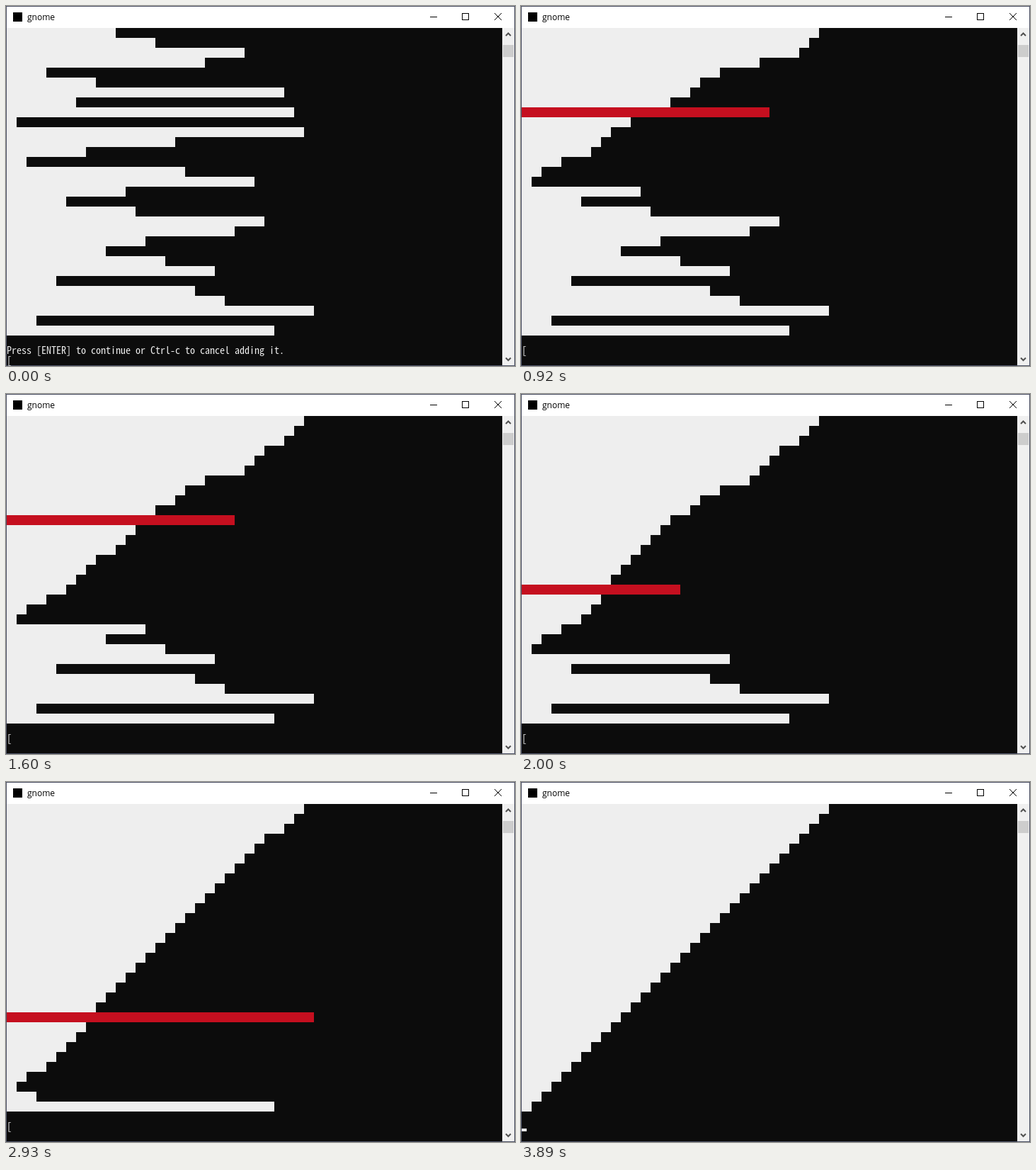
An HTML page for the animation above (4.05 s loop, 719x508 px).

```html
<!DOCTYPE html>
<html lang="en">
<head>
<meta charset="utf-8">
<title>gnome</title>
<style>
  html, body { margin: 0; width: 100%; height: 100%; overflow: hidden; background: #fff; }
  svg { display: block; width: 719px; height: 508px; }
  .title { font: 12px "Open Sans", sans-serif; }
  .console { font: 14px "Noto Sans Mono CJK JP", "Noto Sans Mono", monospace; fill: #eee; white-space: pre; }
  .icon { fill: none; stroke: #000; }
  .chevron { fill: none; stroke: #505050; stroke-width: 2; }
</style>
</head>
<body>
<svg viewBox="0 0 719 508">
  <rect width="719" height="508" fill="#4d5266"/>
  <rect x="1" y="1" width="717" height="30" fill="#fff"/>
  <rect x="10" y="9" width="13" height="13"/>
  <text class="title" x="30" y="20">gnome</text>
  <g class="icon">
    <path d="M599 15.5h10M644.5 10.5h9v9h-9z" shape-rendering="crispEdges"/>
    <path d="M690 10l10 10M700 10l-10 10"/>
  </g>
  <rect x="1" y="31" width="700" height="476" fill="#0c0c0c"/>
  <rect x="701" y="31" width="17" height="476" fill="#f0f0f0"/>
  <rect x="702" y="55" width="15" height="17" fill="#cdcdcd"/>
  <path class="chevron" d="M706 42l3.5-3.5l3.5 3.5M706 496.500l3.5 3.5l3.5-3.5"/>
  <g id="bars" shape-rendering="crispEdges"></g>
  <text id="prompt" class="console" x="1" y="491">Press [ENTER] to continue or Ctrl-c to cancel adding it.</text>
  <text id="bracket" class="console" x="1" y="505">[</text>
  <rect id="cursor" x="1" y="489" width="7" height="4" fill="#eee"/>
</svg>
<script>
const LOOP = 4050, CLEAR = 130, START = 160, END = 3890, HOLD = 2630;
const CELL = 14, WHITE = '#eee', RED = '#c50f1f';
const values = [11, 15, 24, 20, 4, 9, 28, 7, 29, 1, 30, 17, 8, 2, 18, 25,
  12, 6, 13, 26, 23, 14, 10, 16, 21, 5, 19, 22, 31, 3, 27];

// Sorting progress: [time in ms, steps done]
const pace = [[START, 8], [920, 122], [1600, 224], [1720, 243], [2400, 345], [2790, 410],
  [2930, 431], [3370, 495], [3670, 537], [3690, 541], [3870, 567]];

const $ = id => document.getElementById(id);
const show = (id, on) => $(id).style.display = on ? '' : 'none';

// Every state of a descending gnome sort, then one checking sweep
function gnomeSort(list) {
  const a = [...list], states = [];
  const record = mark => states.push({ list: [...a], mark });
  let pos = 0;
  while (pos < a.length) {
    record(pos);
    if (pos === 0 || a[pos] <= a[pos - 1]) pos++;
    else {
      [a[pos - 1], a[pos]] = [a[pos], a[pos - 1]];
      pos--;
    }
  }
  a.forEach((_, row) => record(row));
  record(-1);
  return states;
}

const states = gnomeSort(values);

const bars = values.map((_, row) => {
  const bar = document.createElementNS('http://www.w3.org/2000/svg', 'rect');
  bar.setAttribute('x', 1);
  bar.setAttribute('y', 31 + row * CELL);
  bar.setAttribute('height', CELL);
  return $('bars').appendChild(bar);
});

// The screen refreshes every 20 ms, with one longer pause before HOLD
function refreshTime(t) {
  const snap = from => from + 20 * Math.floor((t - from) / 20);
  return t < HOLD ? Math.min(HOLD - 30, snap(START)) : snap(HOLD);
}

function stepAt(t) {
  const i = Math.max(1, pace.findIndex(([time]) => time >= t));
  const [[t0, s0], [t1, s1]] = [pace[i - 1], pace[i]];
  return Math.floor(s0 + (s1 - s0) * (t - t0) / (t1 - t0) + 1e-6);
}

function stateAt(t) {
  if (t < START) return { list: values, mark: -1 };
  if (t >= END) return states[states.length - 1];
  return states[stepAt(refreshTime(t))];
}

function draw(t) {
  const { list, mark } = stateAt(t);
  const waiting = t < CLEAR, sorting = t >= START && t < END;
  bars.forEach((bar, row) => {
    bar.setAttribute('width', list[row] * CELL);
    bar.setAttribute('fill', row === mark ? RED : WHITE);
  });
  show('bars', waiting || t >= START);
  show('prompt', waiting);
  show('bracket', waiting || sorting);
  $('bracket').setAttribute('y', waiting ? 505 : 491);
  show('cursor', t >= END);
}

const begin = performance.now();
function frame() {
  draw((performance.now() - begin) % LOOP);
  requestAnimationFrame(frame);
}
frame();
</script>
</body>
</html>
```
